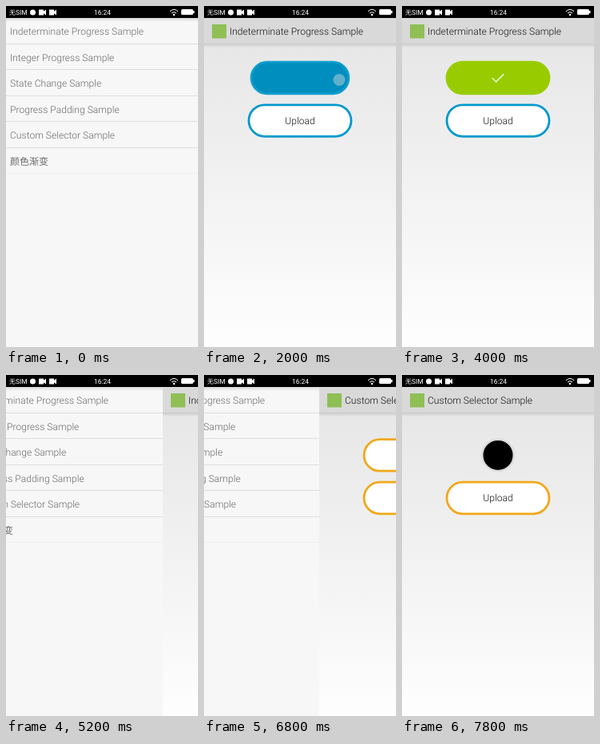
These frames come from a looping animation (240x427 px, 8 s). An HTML page:

```html
<!DOCTYPE html>
<html lang="zh-Hans">
<head>
<meta charset="utf-8">
<title>Progress button samples</title>
<style>
  html, body { margin: 0; width: 100%; height: 100%; overflow: hidden; background: #f7f7f7; }
  svg { display: block; }
  text {
    font: 300 12.1px Roboto, "Liberation Sans", sans-serif;
    text-rendering: geometricPrecision;
  }
  .row { fill: #686868; }
  .cjk { font-family: "Noto Sans CJK SC", "Noto Sans CJK", sans-serif; font-size: 12px; font-weight: 300; }
  .status { fill: #fff; font-size: 8.5px; font-weight: 400; }
  .mid { text-anchor: middle; }
</style>
</head>
<body>
<svg width="240" height="427" viewBox="0 0 240 427">
  <defs>
    <linearGradient id="paper" x2="0" y2="1">
      <stop stop-color="#e7e7e7"/><stop offset="1" stop-color="#fefefe"/>
    </linearGradient>
    <linearGradient id="shade" x2="0" y2="1">
      <stop stop-color="#000" stop-opacity=".13"/><stop offset="1" stop-color="#000" stop-opacity="0"/>
    </linearGradient>
  </defs>

  <g id="list">
    <rect width="240" height="427" fill="#f7f7f7"/>
    <rect y="15" width="240" height="5" fill="url(#shade)"/>
  </g>

  <g id="page">
    <rect y="47" width="240" height="380" fill="url(#paper)"/>
    <rect y="15" width="240" height="32" fill="#d9d9d9"/>
    <rect y="47" width="240" height="5" fill="url(#shade)"/>
    <rect x="10" y="23" width="18" height="17.5" fill="#8fbf55"/>
    <text id="title" x="32" y="36.2" fill="#111"></text>
    <g id="buttons">
      <rect id="first"/>
      <text id="label" class="mid" x="120" y="94.3">Upload</text>
      <g id="ring" fill="none" stroke-width="2.6">
        <circle cx="120" cy="90" r="19.8" fill="#000" stroke="#dcdcdc"/>
        <circle id="arc" cx="120" cy="90" r="19.8" stroke="#0099cc" pathLength="360"/>
      </g>
      <path id="check" d="M112.8 90.2L117.6 95L127.3 85.3" fill="none" stroke="#f0f8dc" stroke-width="1.5"/>
      <rect id="second" x="56" y="123.8" width="128" height="39.6" rx="19.8" fill="#fff" stroke-width="2.8"/>
      <text class="mid" x="120" y="148" fill="#111">Upload</text>
    </g>
  </g>

  <circle id="touch" r="7.5" fill="#c4d2d8" fill-opacity=".5"/>

  <rect width="240" height="15" fill="#000"/>
  <text class="status" x="4" y="11"><tspan class="cjk" style="font-size:8px">无</tspan>SIM</text>
  <g fill="#fff">
    <circle cx="33.5" cy="8" r="3.5"/>
    <path id="cam" d="M41 4.5h6v2.2l3-2.2v7l-3-2.2v2.2h-6z"/>
    <use href="#cam" x="13"/>
    <rect x="219" y="4" width="15" height="7" rx="1.5"/>
    <rect x="234" y="6" width="1.5" height="3"/>
    <circle cx="210" cy="11" r="1.2"/>
  </g>
  <path d="M205 6.8Q210 2 215 6.8M207 9Q210 6.2 213 9" fill="none" stroke="#fff"/>
  <text class="status mid" x="120.5" y="11">16:24</text>
</svg>

<script>
const LOOP = 8000, STEP = 200, MORPH = 400;
const ROWS = ["Indeterminate Progress Sample", "Integer Progress Sample", "State Change Sample",
  "Progress Padding Sample", "Custom Selector Sample", "颜色渐变"];
const BLACK = [0, 0, 0], GREY = [220, 220, 220], WHITE = [255, 255, 255], GREEN = [153, 204, 0];
const SCENES = [
  { title: ROWS[0], tint: [0, 153, 204], drop: 0, press: 1800, shrink: 1932, grow: 3200 },
  { title: ROWS[4], tint: [241, 168, 27], drop: 10.4, press: 7400, shrink: 7400, grow: Infinity }
];
// from, to, x, y
const TOUCHES = [[200, 400, 150, 32], [1800, 2200, 169, 92.5], [6600, 6800, 161, 162], [7400, 7600, 169, 103]];

const $ = id => document.getElementById(id);
const set = (el, attrs) => { for (const k in attrs) el.setAttribute(k, attrs[k]); };
const show = (el, on) => set(el, { visibility: on ? "inherit" : "hidden" });
const ease = (t, start) => 0.5 - 0.5 * Math.cos(Math.PI * Math.min(1, Math.max(0, (t - start) / MORPH)));
const mix = (a, b, k) => a + (b - a) * k;
const rgb = c => `rgb(${c.map(Math.round)})`;
const blend = (a, b, k) => rgb(a.map((v, i) => mix(v, b[i], k)));

function add(tag, attrs, text = "") {
  const el = document.createElementNS("http://www.w3.org/2000/svg", tag);
  set(el, attrs);
  el.textContent = text;
  $("list").append(el);
}

ROWS.forEach((name, i) => {
  const last = i === ROWS.length - 1;
  add("text", { class: last ? "row cjk" : "row", x: 5, y: 36 + i * 32.5 }, name);
  add("rect", { x: 0, y: Math.floor(47.2 + i * 32.5), width: 240, height: 1, fill: last ? "#eeeeee" : "#dedede" });
});

// The arc shrinks and grows in turns while the whole ring rotates.
function drawArc(elapsed) {
  const turn = Math.floor(elapsed / 600);
  const left = 1 - elapsed / 600 + turn;
  const sweep = 300 * (1 - left * left);
  const spin = elapsed * 0.18 - 60 * Math.ceil(turn / 2);
  const growing = turn % 2 === 1;
  const start = growing ? spin : spin + sweep;
  const length = growing ? sweep + 30 : 330 - sweep;
  set($("arc"), { "stroke-dasharray": `${length} ${360 - length}`, transform: `rotate(${start} 120 90)` });
}

function drawButton(t, s) {
  const k = ease(t, s.shrink), g = ease(t, s.grow);
  const pressed = t >= s.press, round = k === 1 && g === 0;
  const width = mix(130.8, 42, k - g);
  const line = 2.8;
  const fill = g > 0 ? blend(BLACK, GREEN, g)
    : pressed ? blend(s.tint, BLACK, k) : rgb(WHITE);
  const stroke = g > 0 ? blend(GREY, GREEN, g) : blend(s.tint, GREY, k);
  set($("first"), {
    x: 120 - width / 2 + line / 2, y: 70.2, width: width - line, height: 39.6, rx: 19.8,
    fill, stroke, "stroke-width": line
  });
  show($("first"), !round);
  show($("ring"), round);
  show($("label"), k === 0);
  set($("label"), { fill: pressed ? "#fff" : "#111" });
  show($("check"), g === 1);

  const spun = t - s.shrink - 453;
  show($("arc"), round && spun >= 0);
  if (spun >= 0) drawArc(spun);
  set($("arc"), { stroke: rgb(s.tint) });
}

function draw(t) {
  const s = SCENES[t < 6000 ? 0 : 1];
  const x = Math.round(240 * (1 - ease(t, 226) + ease(t, 4912) - ease(t, 6626)));
  set($("list"), { transform: `translate(${x - 240} 0)` });
  set($("page"), { transform: `translate(${x} 0)` });
  set($("buttons"), { transform: `translate(0 ${s.drop})` });
  set($("second"), { stroke: rgb(s.tint) });
  $("title").textContent = s.title;
  drawButton(t, s);

  const touch = TOUCHES.find(([from, to]) => t >= from && t < to);
  show($("touch"), touch);
  if (touch) set($("touch"), { cx: touch[2], cy: touch[3] });
}

const begin = performance.now();
function tick() {
  const t = (performance.now() - begin) % LOOP;
  draw(Math.floor(t / STEP) * STEP);
  requestAnimationFrame(tick);
}
tick();
</script>
</body>
</html>
```
